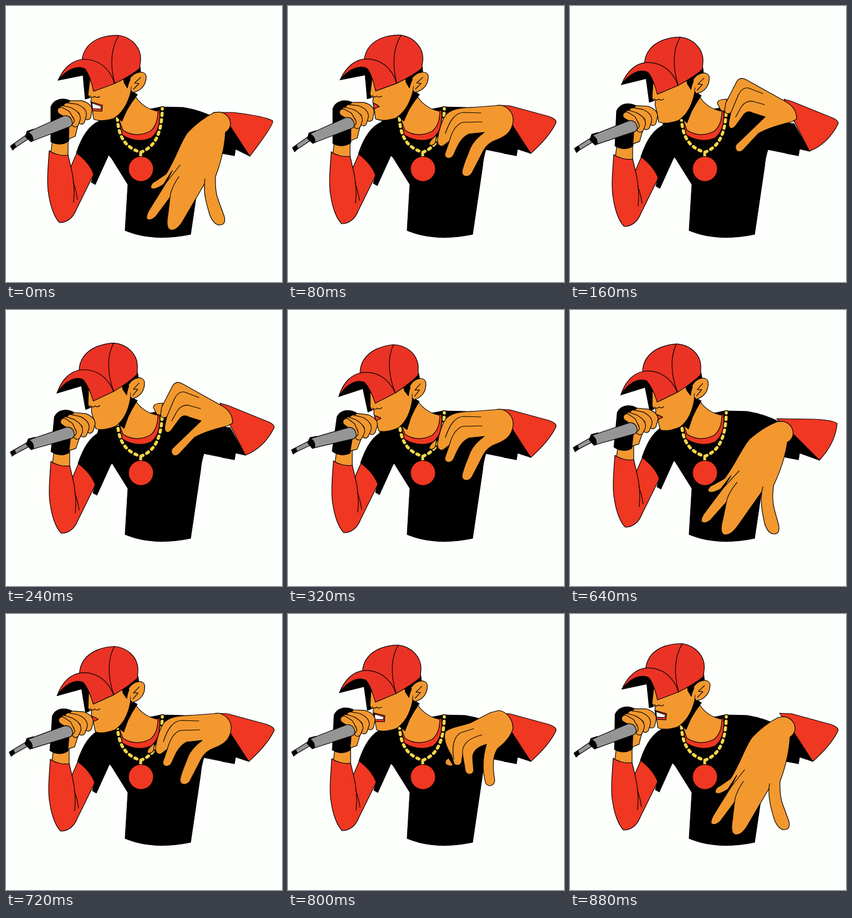
An HTML page that plays this animation: 498x498 px, repeating every 960 ms.

```html
<!DOCTYPE html>
<html lang="en">
<head>
<meta charset="utf-8">
<title>Rapper</title>
<style>
  html, body { margin: 0; height: 100%; overflow: hidden; background: #fdfffc; }
  svg { display: block; width: 100vw; height: 100vh; }
  path, circle { stroke: #000; stroke-width: 1.2; stroke-linejoin: round; stroke-linecap: round; }
  .red { fill: #ef3722; }
  .cap { fill: #ea3325; }
  .skin { fill: #f2982f; }
  .line { fill: none; }
  .grey { fill: #959595; }
  .finger { fill: none; stroke-width: 13.6; }
  .finger + .finger.fill { stroke: #f2982f; stroke-width: 11.2; }
  .link { fill: none; stroke-width: 8.6; stroke-dasharray: 4 7.6; }
  .link.gold { stroke: #f5d64c; stroke-width: 5.6; }
</style>
</head>
<body>
<svg viewBox="0 0 498 498">
  <g id="arm">
    <path class="skin" d="M84 240L112 240 112 275 80 272Z"/>
    <path class="red" d="M78 261C86 267 100 271 112 269L117 290 130 260 160 300 127 367Q118 390 97 391C88 383 80 362 77 340C73 320 76 290 78 261Z"/>
    <path class="line" d="M117 290C122 310 124 335 122 354M121 318Q126 330 129 349"/>
    <path d="M172 206C150 214 137 235 127 265Q150 282 158 303L154 318 161 322 185 269 215 225Z"/>
  </g>
  <path d="M170 206L200 198 280 182 320 183Q350 188 376 201L404 215 414 258 412 270 357 259Q352 275 351 290L333 412Q265 426 215 405L220 322 190 274 160 240Z"/>
  <path class="red" d="M203 200L209 232Q235 249 262 238Q281 222 277 188Z"/>
  <path class="skin" d="M215 160L234 164Q248 185 274 190Q274 215 260 226Q234 239 211 224L202 200Z"/>
  <path class="link" d="M201 202C203 240 218 256 243 264C270 254 281 228 282 185"/>
  <path class="link gold" d="M201 202C203 240 218 256 243 264C270 254 281 228 282 185"/>
  <path class="line" style="stroke:#f5d64c;stroke-width:5" d="M243 266V273"/>
  <circle class="red" cx="243.500" cy="294" r="22.500"/>

  <g id="head">
    <path d="M222 150L237 160Q226 174 218 188L209 208 195 195 206 188Z"/>
    <path d="M94 134Q110 108 138 105L160 140 150 166 143 168 139 125Z"/>
    <path class="skin" d="M151 134L148 160Q150 165 154 166L153 173 156 188 158 204Q170 210 194 203Q216 190 225 156L230 120 190 130Z"/>
    <path d="M212 130L242 110 243 122 229 126Q221 136 219 148L213 138Z"/>
    <path class="skin" d="M224 130C234 117 251 116 253 127C253 142 244 154 228 156"/>
    <path class="line" d="M243 129L232 139 240 140 230 150M152 162q4 5 8 1q5 4 9 0"/>
    <g id="teeth">
      <path class="red" d="M154 173L174 179 173 190 156 189Z"/>
      <path fill="#fff" d="M155 175L172 181 171 186 156 185Z"/>
    </g>
    <path id="lips" class="red" d="M154 176Q158 177 165 182L155 186Z"/>
    <path class="cap" d="M137 99C139 78 152 64 172 57Q190 52 204 53C228 57 244 76 243 97L241 113Q225 126 196 140Z"/>
    <path class="line" d="M203 54C190 75 187 105 196 139"/>
    <path class="cap" d="M94 134C105 109 122 97 140 96C166 96 187 111 196 140L158 154Q152 126 143 114C130 106 109 114 94 134Z"/>
  </g>

  <g id="mic">
    <path d="M81 182C86 169 100 165 114 170L126 180 113 244Q98 254 81 245Z"/>
    <path class="skin" d="M114 205L131 210 125 235 113 240Z"/>
    <g id="fingers"></g>
    <path class="grey" d="M36 233L40 240 13 258 9 252Z"/>
    <path d="M15 248L18 254 12 260 8 253Z"/>
    <path d="M38 226L50 222 55 240 45 245 35 236Z"/>
    <path class="grey" d="M45 225L105 198Q118 197 120 212L117 217 49 243Q49 232 40 228Z"/>
  </g>

  <path id="underside"/>
  <path id="sleeve" class="red"/>
  <g id="hand">
    <path id="thumb" class="skin"/>
    <path id="palm" class="skin"/>
    <path id="creases" class="line"/>
  </g>
</svg>
<script>
const el = id => document.getElementById(id);
const set = (id, name, value) => el(id).setAttribute(name, value);

el('fingers').innerHTML = [
  'M118 177L136 177Q149 181 149 188L147 199',
  'M110 181L126 183Q139 188 139 196L136 207',
  'M102 186L114 189Q128 195 128 203L125 212',
  'M99 189L110 195 117 207'
].map(d => `<path class="finger" d="${d}"/><path class="finger fill" d="${d}"/>`).join('');

// Each sleeve hangs down to its hem, with the dark lining below
const sleeves = {
  level: { hem: '438 266', shape: 'M378 179L400 180 470 199Q487 205 483 212Q470 238 438 266L403 212Z' },
  flat: { hem: '440 271', shape: 'M374 192L410 192Q468 199 481 207Q486 211 440 271L404 216Z' },
  sunk: { hem: '450 271', shape: 'M373 196L440 197Q478 199 482 205Q479 240 450 271L404 225Z' },
  lifted: { hem: '432 262', shape: 'M386 168L400 172 474 202Q487 208 483 214Q465 249 432 262L403 205Z' }
};

const hands = {
  low: {
    palm: 'M374 193C392 187 406 199 405 215Q403 224 396 228Q394 265 378 308Q377 335 383 350L394 380Q397 395 386 395Q376 396 368 378C361 355 357 340 358 321L319 388Q308 406 297 404Q288 402 292 378L296 345 270 380Q260 389 254 384Q252 378 261 364L289 319 300 297 284 322Q266 334 261 328Q261 320 270 316L289 303C308 272 315 245 328 228Q350 205 374 193Z',
    creases: 'M296 345Q297 330 312 308M289 319L314 287M358 321L359 312'
  },
  mid: {
    thumb: 'M268 233Q254 244 255 250Q260 254 266 247Z',
    palm: 'M385 179C400 184 408 195 406 210C403 228 392 236 375 242Q358 248 350 266L334 297C329 310 316 310 314 301C314 291 322 275 329 256Q336 241 354 228L326 231C312 238 306 252 300 266C296 278 282 277 283 267L291 244 283 250C276 257 268 250 270 240C272 225 278 205 286 195C300 182 320 184 345 182Z',
    creases: 'M291 244C297 222 305 213 315 210L350 209M284 230C292 206 302 192 318 192L348 193'
  },
  high: {
    thumb: 'M283 168Q266 168 266 176L272 188 279 190Z',
    palm: 'M388 172L318 133Q307 127 301 136L281 175 279 188Q280 197 290 193L287 207C284 221 292 224 298 217L314 195Q321 188 330 193L352 200 300 250Q296 257 302 262Q308 265 314 258L340 230Q358 219 400 209L409 204Q409 183 388 172Z',
    creases: 'M290 193L304 160Q311 146 322 148L348 158M299 200L309 182Q319 168 333 173L351 178'
  },
  droop: {
    thumb: 'M290 260Q283 263 284 270Q289 276 298 273Z',
    palm: 'M380 174C395 176 406 190 406 207C400 225 388 235 378 243C369 257 369 275 373 300C372 312 359 313 356 303C351 283 350 262 358 235Q334 242 333 258L335 283C333 291 322 291 320 283L315 253 313 268C310 275 300 274 299 268L295 255C284 238 280 222 284 212C295 203 315 202 330 196L365 178Z',
    creases: 'M299 262C295 238 300 220 312 214L335 207M315 253C313 234 327 224 350 218'
  }
};

// One row per 80 ms: hand, sleeve, hand transform, head angle, mouth, mic x/y/angle, arm x/y
const low = (x, y, angle) => `translate(${x} ${y}) rotate(${angle} 400 195)`;
const poses = [
  ['low', 'flat', '', 0, 'teeth', 0, 0, 0, 0, 0],
  ['mid', 'level', '', 0.3, 'lips', 0, 3, 0, 0, 2],
  ['high', 'lifted', '', -2.5, '', 2, 9, 2.5, 1, 7],
  ['high', 'lifted', '', -5, '', 4, 14, 5.5, 3, 12],
  ['mid', 'level', '', -7, 'lips', 4, 15, 8, 4, 11],
  ['droop', 'level', '', -8, 'teeth', 5, 14, 9, 5, 8],
  ['low', 'sunk', low(0, 15, 5), -8.2, 'teeth', 5, 12, 9.5, 5, 5],
  ['low', 'sunk', low(0, 14, 5), -7.4, 'teeth', 3, 9, 7.5, 4, 3],
  ['low', 'sunk', low(-1, 11, 5), -6, 'lips', 2, 6, 5.5, 3, 1],
  ['mid', 'level', '', -4.2, 'lips', 1, 4, 4, 2, 1],
  ['droop', 'level', '', -2.5, 'teeth', 1, 2, 3, 1, 0],
  ['low', 'level', low(1, -6, 0), -0.5, 'teeth', 0, 0, 1, 0, -1]
];

function draw(now) {
  const [handName, sleeveName, handMove, headAngle, mouth, micX, micY, micAngle, armX, armY] =
    poses[Math.floor(now / 80) % poses.length];
  const hand = hands[handName], sleeve = sleeves[sleeveName];
  set('thumb', 'd', hand.thumb || '');
  set('palm', 'd', hand.palm);
  set('creases', 'd', hand.creases);
  set('hand', 'transform', handMove);
  set('sleeve', 'd', sleeve.shape);
  set('underside', 'd', `M390 212L404 212L${sleeve.hem}L414 258 412 270 390 266Z`);
  set('head', 'transform', `rotate(${headAngle} 275 165)`);
  for (const id of ['teeth', 'lips']) set(id, 'visibility', id === mouth ? 'visible' : 'hidden');
  set('mic', 'transform', `translate(${micX} ${micY}) rotate(${micAngle} 115 205)`);
  set('arm', 'transform', `translate(${armX} ${armY})`);
  requestAnimationFrame(draw);
}
draw(0);
</script>
</body>
</html>
```
